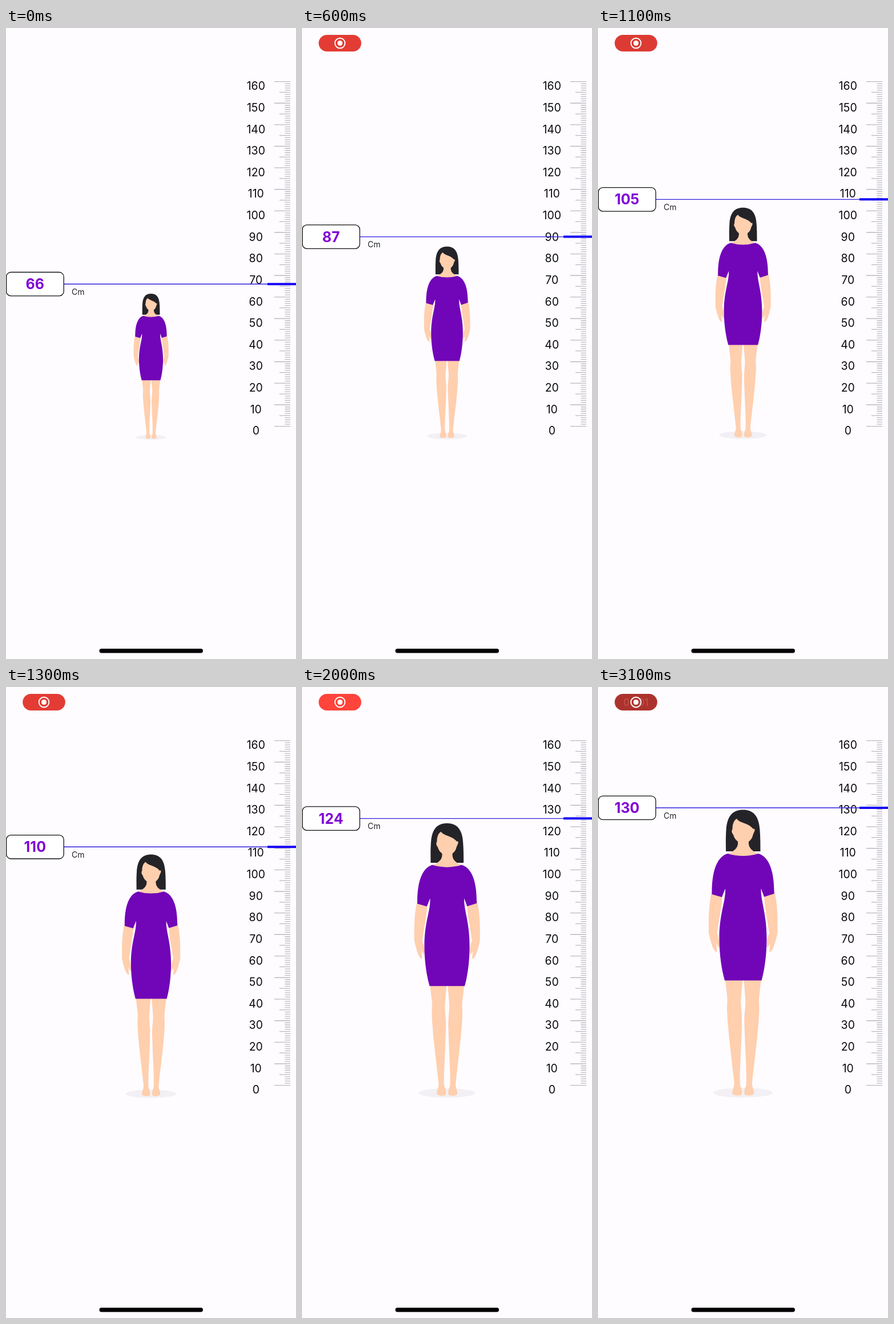
Animation, 508 px wide and 1102 px high, one loop 3.2 s. Source, as an HTML page:

```html
<!DOCTYPE html>
<html lang="en">
<head>
<meta charset="utf-8">
<title>Height picker</title>
<style>
  html, body { margin: 0; width: 100%; height: 100%; overflow: hidden; background: #fefcff; }
  svg { display: block; width: 508px; height: 1102px; font-family: Inter, sans-serif; }
  .skin { fill: #ffcfae; }
  .hair { fill: #242328; }
  .dress { fill: #7105b8; }
</style>
</head>
<body>
<svg viewBox="0 0 508 1102">
  <defs>
    <g id="limbs" class="skin">
      <path d="M222.500 508L226.500 543C227 553 225.500 558 226.300 570C228 605 234 648 238.500 690C239.500 699 234 704 235.500 711Q243 715.500 251.500 712Q254 706 249 696C247.500 680 250.500 640 252 590C253 568 249 558 250.500 543L253.500 508Z"/>
      <path d="M200 355C194 375 193.500 405 194 430C197 442 200 455 204 460Q207 464 208.500 462L207 447Q210 455 212.500 455Q213.500 440 208.500 430C211 410 217 385 218 360Z"/>
    </g>
  </defs>

  <g id="ruler" stroke="#bbbac0" stroke-width="1.3"></g>
  <g id="labels" font-size="19.500" text-anchor="middle" fill="#0b0b0d"></g>

  <g id="figure">
    <ellipse cx="254" cy="708.500" rx="52" ry="8.500" fill="#f2f0f4"/>
    <use href="#limbs"/>
    <use href="#limbs" transform="matrix(-1 0 0 1 508.500 0)"/>
    <path class="hair" d="M224 287C224 275 223.500 265 224.500 250C226 225 236 214.500 254 214.500C272 214.500 282 225 283.500 250C284.500 265 284.500 275 284.500 287Z"/>
    <path class="skin" d="M245 260V274Q244 285 227 291Q254 304 281 291Q265 285 264 274V260Z"/>
    <path class="skin" d="M243 230C248 238 263 237 272 248Q275 246 274.500 251L271.500 258C270 267 262 273 254.500 273C248 273 239.500 268 237 258Q232.500 253 235.500 248C235.500 242 237 233 243 230Z"/>
    <path class="dress" d="M227 291Q254 299 281 291C298 296 309 318 308.500 361L291 366.500L285.500 352C285 375 295.500 395 295.500 440C295.500 470 291 497 286.500 512.500H222C217.500 497 212.500 470 212.500 440C212.500 395 224 375 223 352L217 367L199.500 362C199 318 210 296 227 291Z"/>
  </g>

  <g id="marker">
    <path d="M101 0H458" stroke="#3020e0" stroke-width="1.4"/>
    <path d="M458 0H508" stroke="#1500f5" stroke-width="4"/>
    <rect x=".6" y="-20.700" width="100.600" height="41.400" rx="8" fill="#fff" stroke="#111" stroke-width="1.3"/>
    <text id="value" x="50.800" y="9" font-size="25" font-weight="700" text-anchor="middle" fill="#8003d6"></text>
    <text x="115" y="18.800" font-size="14" fill="#222">Cm</text>
  </g>

  <g id="pill">
    <rect id="pillBack" x="-37.300" y="-14.500" width="74.600" height="29" rx="14.500"/>
    <text id="clock" y="6" font-size="17" text-anchor="middle" fill="#ff9a90" opacity=".3">00:01</text>
    <circle r="8.800" fill="none" stroke="#fff" stroke-width="1.900"/>
    <circle r="4.500" fill="#fff"/>
  </g>
  <rect x="163.500" y="1084" width="181.500" height="7.500" rx="3.700"/>
</svg>
<script>
const LOOP = 3200, STEP = 100;
const TIMES = [0, 300, 900, 1300, 2000, 2400];
const HEIGHTS = [66, 76, 98, 110, 124, 130];
const LINE_Y = [447.2, 407, 323.6, 279.3, 229.6, 211];
const el = id => document.getElementById(id);

// Smooth cubic through the keys, held after the last one
function track(keys, t) {
  const last = keys.length - 1;
  if (t >= TIMES[last]) return keys[last];
  const i = TIMES.findIndex(time => time > t) - 1;
  const slope = k => {
    const a = Math.max(k - 1, 0), b = Math.min(k + 1, last);
    return (keys[b] - keys[a]) / (TIMES[b] - TIMES[a]);
  };
  const span = TIMES[i + 1] - TIMES[i], u = (t - TIMES[i]) / span, w = 1 - u;
  return w * w * ((1 + 2 * u) * keys[i] + u * span * slope(i))
    + u * u * ((1 + 2 * w) * keys[i + 1] - w * span * slope(i + 1));
}

function buildRuler() {
  let ticks = '', labels = '';
  for (let cm = 0; cm <= 160; cm++) {
    const y = 695.6 - cm * 3.7625;
    const x = cm % 10 === 0 ? 470 : cm % 5 === 0 ? 479 : 488.5;
    ticks += `M${x} ${y}H498`;
    if (cm % 10 === 0) labels += `<text x="437.8" y="${y + 14.7}">${cm}</text>`;
  }
  el('ruler').innerHTML = `<path d="${ticks}"/>`;
  el('labels').innerHTML = labels;
}

function drawPill(t) {
  const grow = Math.min(t / 400, 1);
  const ending = t >= 3100;
  const light = ending ? 0.667 : 0.928 + 0.073 * Math.cos((t - 2050) / 2200 * 2 * Math.PI);
  const shade = t < 500 ? 0.95 : light;
  el('pill').setAttribute('transform', `translate(66.5 26.5) scale(${0.55 + 0.45 * grow})`);
  el('pill').setAttribute('opacity', ending ? 0.97 : grow);
  el('pillBack').setAttribute('fill', `rgb(${[255, 68, 59].map(c => Math.round(c * shade))})`);
  el('clock').setAttribute('visibility', ending ? 'visible' : 'hidden');
}

function draw(now) {
  // The picture advances ten times a second
  const t = Math.floor(now % LOOP / STEP) * STEP;
  const height = track(HEIGHTS, t);
  el('value').textContent = Math.round(height);
  el('marker').setAttribute('transform', `translate(0 ${track(LINE_Y, t)})`);
  el('figure').setAttribute('transform',
    `translate(254 721.3) scale(${height / 130}) translate(-254 -721.3)`);
  drawPill(t);
}

buildRuler();
const start = performance.now();
function tick() {
  draw(performance.now() - start);
  requestAnimationFrame(tick);
}
tick();
</script>
</body>
</html>
```
